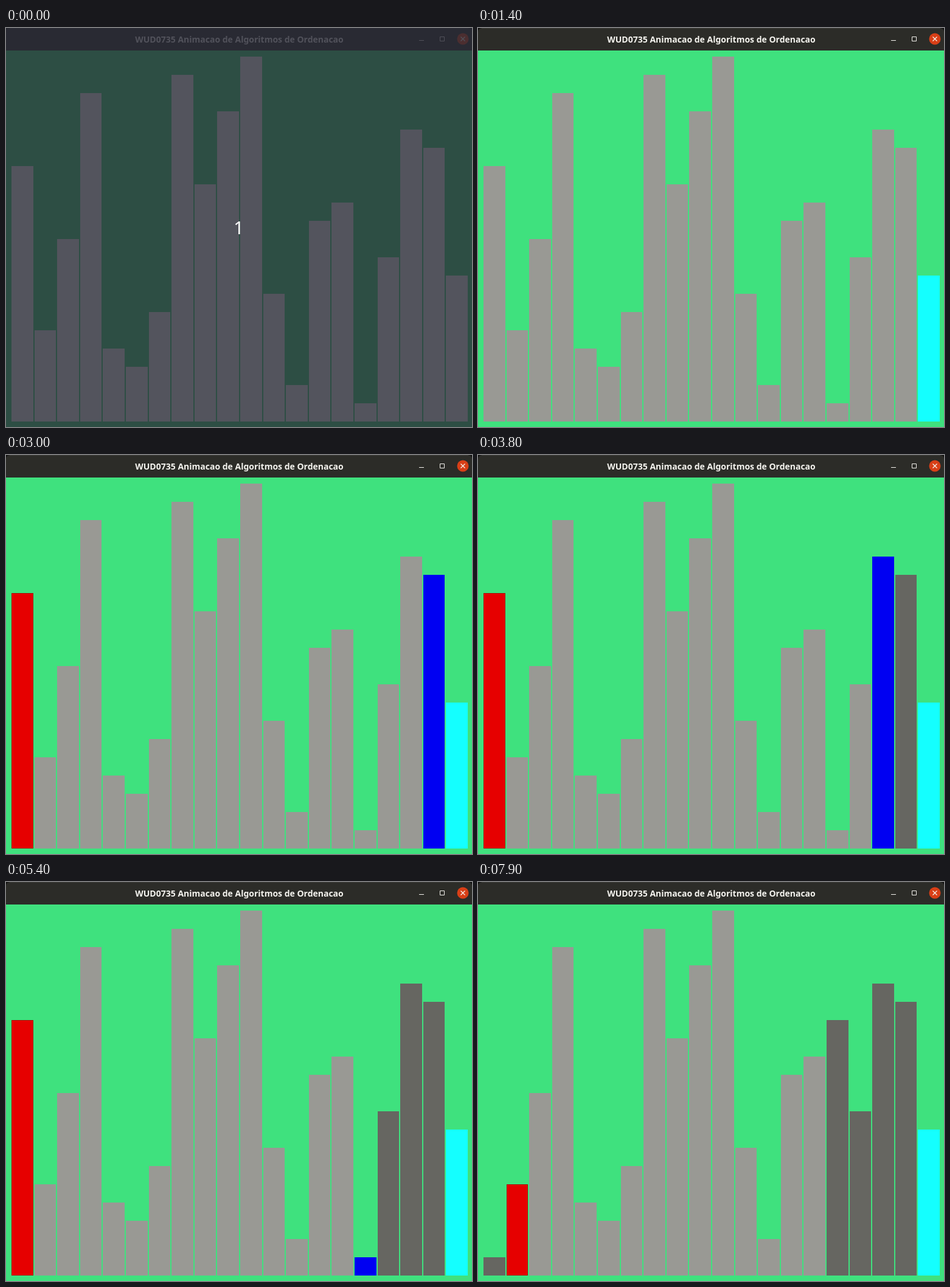
These frames come from a looping animation (766x656 px, 8000 ms). An HTML page:

```html
<!DOCTYPE html>
<html lang="pt">
<head>
<meta charset="utf-8">
<title>Ordenacao</title>
<style>
  html, body { margin: 0; width: 100%; height: 100%; overflow: hidden; background: #101010; }
  svg { display: block; width: 766px; height: 656px; }
  text { font-family: "Noto Sans", "Open Sans", sans-serif; text-anchor: middle; }
  .title { font-size: 14px; font-weight: 700; fill: #f4f3ee; }
  .count { font-size: 29px; fill: #fff; }
  .icon { fill: none; stroke: #f4f3ee; }
  #intro { animation: intro 8s step-end infinite; }
  @keyframes intro { 0% { visibility: visible; } 2.5%, 100% { visibility: hidden; } }
</style>
</head>
<body>
<svg viewBox="0 0 766 656">
  <rect y="37" width="766" height="619" fill="#3fe17e"/>
  <path d="M0 37V7Q0 0 7 0H759Q766 0 766 7V37Z" fill="#2c2c28"/>
  <path d="M6 .5H760" stroke="#3b3b37"/>
  <text class="title" x="383.5" y="24">WUD0735 Animacao de Algoritmos de Ordenacao</text>
  <path class="icon" d="M679 20.5H687M713.5 14.5H720.5V21.5H713.5Z"/>
  <circle cx="751" cy="18" r="9.5" fill="#d83f17"/>
  <path class="icon" d="M747.5 14.5L754.5 21.5M754.5 14.5L747.5 21.5" stroke-width="1.3"/>
  <g id="bars"></g>
  <g id="intro">
    <rect width="766" height="656" fill="#282a36" opacity=".8"/>
    <text class="count" x="382.5" y="339">1</text>
  </g>
</svg>
<script>
const LOOP = 8000;
const VALUES = [14, 5, 10, 18, 4, 3, 6, 19, 13, 17, 20, 7, 2, 11, 12, 1, 9, 16, 15, 8];
const LAST = VALUES.length - 1;
const SMALL = 15;
const WHITE = '#fffffc', GREY = '#999994', DARK = '#666661';
const RED = '#e60000', BLUE = '#0000f2', CYAN = '#14ffff';

// Start times: plain, pivot, left cursor, four right cursors, swap, settled, next left.
const STEPS = [0, 1400, 2200, 3000, 3800, 4600, 5400, 6200, 7000, 7900];

const bars = VALUES.map((_, i) => {
  const bar = document.createElementNS('http://www.w3.org/2000/svg', 'g');
  const body = document.createElementNS(bar.namespaceURI, 'rect');
  const edge = document.createElementNS(bar.namespaceURI, 'rect');
  const x = Math.round(9 + 37.6 * i);
  const w = Math.round(44.6 + 37.6 * i) - x;
  body.setAttribute('x', x);
  body.setAttribute('width', w);
  edge.setAttribute('x', x + .5);
  edge.setAttribute('width', w - 1);
  edge.setAttribute('fill', 'none');
  bar.append(body, edge);
  document.getElementById('bars').append(bar);
  return { body, edge };
});

function color(i, step) {
  if (step === 0) return WHITE;
  if (i === LAST) return CYAN;
  const right = step < 3 ? LAST : Math.max(SMALL, 21 - step);
  if (step < 7) {
    if (i === 0 && step > 1) return RED;
    if (i === right) return BLUE;
    return i > right ? DARK : GREY;
  }
  if (step === 7 && i === 0) return BLUE;
  if (step === 7 && i === SMALL) return RED;
  if (step === 9 && i === 1) return RED;
  return i === 0 || i >= SMALL ? DARK : GREY;
}

function valueAt(i, step) {
  if (step > 6) {
    if (i === 0) return VALUES[SMALL];
    if (i === SMALL) return VALUES[0];
  }
  return VALUES[i];
}

function show(step) {
  bars.forEach(({ body, edge }, i) => {
    const h = 30 * valueAt(i, step);
    const fill = color(i, step);
    body.setAttribute('y', 647 - h);
    body.setAttribute('height', h);
    body.setAttribute('fill', fill);
    edge.setAttribute('y', 647.5 - h);
    edge.setAttribute('height', h - 1);
    edge.setAttribute('stroke', fill === RED ? '#a80d08' : 'none');
  });
}

const intro = document.getElementById('intro').getAnimations()[0];
let shown = -1;
function tick() {
  const t = performance.now();
  intro.currentTime = t;
  const step = STEPS.findLastIndex(start => t % LOOP >= start);
  if (step !== shown) show(shown = step);
  requestAnimationFrame(tick);
}
tick();
</script>
</body>
</html>
```
